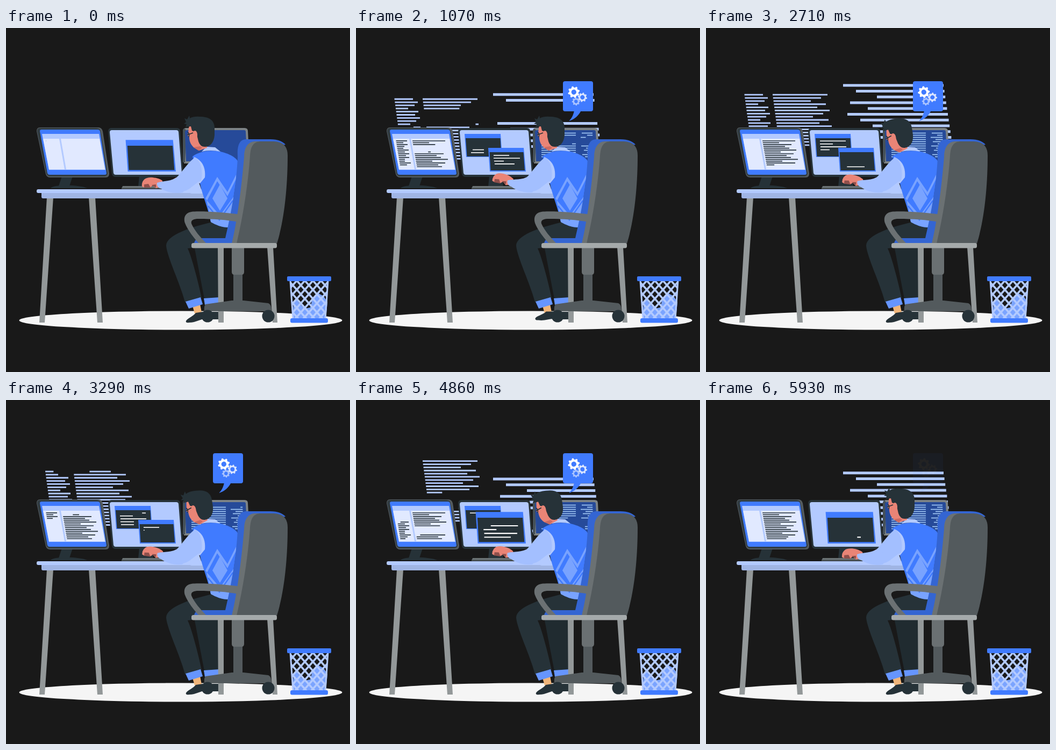
An HTML page for the animation above (6 s loop, 640 by 640 pixels).

```html
<!DOCTYPE html>
<html lang="en">
<head>
<meta charset="utf-8">
<title>Developer at work</title>
<style>
html, body { margin: 0; width: 100%; height: 100%; overflow: hidden; background: #191919; }
svg { display: block; width: 100vw; height: 100vh; }
</style>
</head>
<body>
<svg viewBox="0 0 640 640">
  <defs>
    <clipPath id="bin"><path d="M528 470H600L595 541H533Z"/></clipPath>
  </defs>
  <rect width="640" height="640" fill="#191919"/>
  <ellipse cx="325" cy="544" rx="300.500" ry="17.500" fill="#f5f5f5"/>
  <g id="backdrop"></g>

  <!-- right monitor -->
  <path d="M335 186H444Q450 186 450 192L453 252H331L329 192Q329 186 335 186Z" fill="#7d8386"/>
  <path d="M332 187L336 191L333 250H329V192Q329 188 332 187Z" fill="#465158"/>
  <path d="M338 190H443Q446 190 446 193L449 248H335L333 193Q333 190 338 190Z" fill="#264a99"/>
  <g id="sideCode"></g>

  <!-- left monitor -->
  <path d="M104 276H124L118 294H98Z" fill="#263238"/>
  <path d="M83 298C88 290 140 292 151 298Z" fill="#263238"/>
  <path d="M63 185H172Q178 185 180 192L192 271Q192 278 186 278H82Q76 278 74 272L57 192Q57 185 63 185Z" fill="#555c60"/>
  <path d="M63 186H168Q175 186 176 192L189 270Q189 275 184 276H82Q77 276 75 271L58 192Q58 186 63 186Z" fill="#303b41"/>
  <path d="M66 189H171Q174 189 175 192L187 270Q187 273 184 273H81Q78 273 77 270L63 192Q63 189 66 189Z" fill="#407bff"/>
  <path d="M67 197H173L185 264H80Z" fill="#b3caff"/>
  <path d="M69 206H99L109 263H80ZM102 206H174L184 263H112Z" fill="#e1e9ff"/>
  <g id="leftCode"></g>

  <!-- middle monitor -->
  <path d="M248 275H272L274 295H246Z" fill="#263238"/>
  <path d="M196 186H318Q324 186 324 192L330 271Q330 277 324 277H204Q198 277 197 271L190 193Q190 186 196 186Z" fill="#28343a"/>
  <path d="M197 190H317Q320 190 321 193L327 270Q327 273 324 273H204Q201 273 200 270L193 194Q193 190 197 190Z" fill="#b3caff"/>
  <g id="rearWin">
    <path d="M202 197H269L272 240H205Z" fill="#407bff"/>
    <path d="M204 205H268.500L270.500 239H206.500Z" fill="#263238"/>
  </g>
  <g id="frontWin">
    <path d="M246 223H312L316 267H249Z" fill="#407bff"/>
    <path d="M248.500 231H311.500L314 265H250.500Z" fill="#263238"/>
  </g>

  <!-- desk -->
  <path d="M76 315H88L72 548H62ZM154 315H166L180 548H170Z" fill="#939899"/>
  <path d="M66 306H372L376 317H69Q66 317 66 314Z" fill="#a0b5e4"/>
  <rect x="57" y="300" width="320" height="7" rx="3" fill="#b3caff"/>
  <path d="M217 294H305V299H215Z" fill="#6b7274"/>
  <path d="M215 297H305V299.500H215Z" fill="#4f575a"/>

  <g id="bubble">
    <path d="M406 153H419C414 164 406 170 396 173C402 168 405 160 406 153Z" fill="#407bff"/>
    <rect x="385" y="99" width="56" height="56" rx="4" fill="#407bff"/>
  </g>

  <!-- legs and shoes -->
  <path d="M350 405L369 504L398 503L396 400Z" fill="#202b30"/>
  <path d="M377 533L384 528H397V542H376Z" fill="#263238"/>
  <path d="M368 503L397 501L399 513L370 515Z" fill="#6695ff"/>
  <path d="M347 517L361 514L364 529L351 531Z" fill="#f0b57a"/>
  <path id="foot" d="M335 547C333 542 348 537 353 530L366 528L373 533V541C361 541 354 548 341 548Q336 549 335 547Z" fill="#263238"/>
  <path d="M384 361C345 370 298 385 298 405C300 427 324 475 333 510L364 502C358 475 347 430 338 410L420 402V362Z" fill="#263238"/>
  <path d="M334 509L362 501L366 514L340 522Z" fill="#6695ff"/>

  <!-- body -->
  <path d="M306 288Q310 280 320 277L326 284L316 292Z" fill="#e98476"/>
  <path d="M326 300L357 282L366 308H345Z" fill="#b3caff"/>
  <path d="M347 239C362 227 385 228 394 229C416 233 431 242 433 252L415 371C401 371 390 366 381 361C377 338 365 310 361 290Z" fill="#407bff"/>
  <path d="M371 317L393 277L412 305L428 273V281L412 313L393 285L374 321Z" fill="#79a3ff"/>
  <path d="M398 291L412 317L398 340L384 317Z" fill="#79a3ff"/>
  <path d="M373 320L398 349L427 309L415 371C401 371 390 366 381 361Q378 341 373 320Z" fill="#79a3ff"/>
  <path d="M376 331L397 357L422 321" fill="none" stroke="#407bff" stroke-width="2.500"/>
  <path d="M364 230L373 221L389 222L399 230Q380 226 364 230Z" fill="#b3caff"/>
  <path d="M350 240C364 246 372 258 370 278L361 289L345 285Z" fill="#b3caff"/>
  <path d="M352 241C341 247 329 266 316 280L318 300C326 308 338 302 345 296C352 291 357 286 363 284C367 268 363 248 352 241Z" fill="#a3bfff"/>
  <g id="arm">
    <g id="hand">
      <path d="M291 284C281 277 263 276 257 282Q252 287 253 295L258 297Q259 291 264 291L268 297L273 293L279 298L291 295Z" fill="#e98476"/>
      <path d="M257 291L265 290L269 297H257ZM271 292L279 291V297Z" fill="#8f4f4b"/>
    </g>
    <path d="M320 276C308 286 293 284 281 288C280 294 284 298 289 299C298 305 314 309 329 306L338 292Z" fill="#a3bfff"/>
  </g>

  <g id="head">
    <path d="M341 182C339 188 340 193 338 200L341 203C341 211 344 217 349 222L359 228L374 223V195L350 180Z" fill="#e98476"/>
    <path d="M349 222L361 220L365 223L358 228Z" fill="#cc6b62"/>
    <path d="M334 184L336 179L331 178L335 175L332 168L337 170L341 163L342 168Q349 164 361 165C377 165 388 171 388 186V199C387 214 379 221 370 221Q361 221 358 211L354 194L346 191L344 183Z" fill="#263238"/>
    <ellipse cx="351.500" cy="199" rx="4.500" ry="8" fill="#e98476"/>
    <path d="M337 199L348 195M338 194Q342 196 340 203" fill="none" stroke="#263238" stroke-width="1.600"/>
  </g>

  <!-- chair -->
  <path d="M394 408H405V548H395ZM486 408H497L505 548H496Z" fill="#939899"/>
  <rect x="423" y="455" width="17" height="60" fill="#535a5d"/>
  <path d="M420 408H443V454Q443 459 438 459H425Q420 459 420 454Z" fill="#6a7072"/>
  <path d="M371 514L420 507H442L488 512Q494 514 494 527H369Q368 518 371 514Z" fill="#535a5d"/>
  <circle cx="375" cy="536" r="11.500" fill="#263238"/>
  <circle cx="488" cy="536" r="11.500" fill="#263238"/>
  <path d="M431 240C430 220 433 207 448 207H492Q511 207 520 217L460 230L424 400H350Q352 391 362 391H408C418 350 429 290 431 240Z" fill="#3465d2"/>
  <path d="M443 240C443 220 452 211 464 211H484L470 260L440 401H420C429 365 438 300 443 240Z" fill="#6b7173"/>
  <path d="M454 238C455 219 461 211 475 211H498Q524 212 524 237C524 300 517 360 504 401H429C440 355 450 295 454 238Z" fill="#535a5d"/>
  <path d="M434 347C410 343 360 340 345 342C333 344 330 353 333 363C338 376 350 391 359 401H373C362 390 350 376 345 364C343 357 350 355 358 355C385 355 412 357 432 361Z" fill="#6b7173"/>
  <rect x="345" y="400" width="159" height="9.500" rx="3.500" fill="#a5aaab"/>

  <!-- basket -->
  <path d="M533 541L535 512L541 506L549 516L556 522L566 520L570 505L580 493L591 499L598 510L595 541Z" fill="#7ba4ff"/>
  <g id="mesh" clip-path="url(#bin)" stroke="#b3caff" stroke-width="3.600"></g>
  <path d="M529 470L534 541M599 470L594 541" stroke="#b3caff" stroke-width="3"/>
  <rect x="523" y="462" width="82" height="9" rx="2" fill="#407bff"/>
  <rect x="529" y="540" width="70" height="8.500" rx="3" fill="#407bff"/>
</svg>
<script>
const LOOP = 6, HALF = 3;
const $ = id => document.getElementById(id);
const clamp = v => Math.min(1, Math.max(0, v));
const ramp = (t, a, b) => { const k = clamp((t - a) / (b - a)); return k * k * (3 - 2 * k); };

function add(parent, tag, attrs) {
  const el = document.createElementNS('http://www.w3.org/2000/svg', tag);
  for (const k in attrs) el.setAttribute(k, attrs[k]);
  parent.appendChild(el);
  return el;
}

// A block of code rows; rows are [start, end] pairs.
function block(parent, rows, y, dy, color, width) {
  const g = add(parent, 'g', { stroke: color, 'stroke-width': width });
  const items = rows.map(([a, b], i) =>
    ({ a, b, el: add(g, 'line', { y1: y + i * dy, y2: y + i * dy }) }));
  return { g, items };
}

function show({ items }, range, back) {
  items.forEach(({ a, b, el }, i) => {
    let [from, to] = range(i);
    if (back) [from, to] = [1 - to, 1 - from];
    el.setAttribute('x1', a + (b - a) * from);
    el.setAttribute('x2', a + (b - a) * to);
    el.setAttribute('visibility', to - from > .01 ? 'visible' : 'hidden');
  });
}

// span: text between the erase and type fronts; gap: old text beyond the erase front stays.
const span = (type, erase) => i => [clamp(erase - i), clamp(type - i)];
const gap = (type, erase) => i => type > i ? [0, clamp(type - i)] : [clamp(erase - i), 1];
const slanted = (ends, x, step) => ends.map((e, i) => [x + i * step, e]);

const back = $('backdrop'), pale = '#b3caff', ink = '#263238';
const noteA = block(back, slanted([106, 115, 109, 97, 116, 110, 119, 112, 101, 120, 115, 123], 71.5, .8), 0, 5.85, pale, 2.8);
const noteB = block(back, slanted([226, 214, 195, 223, 207, 230, 218, 199, 228, 211, 234, 222, 230, 236,
  225, 238, 230, 226, 235, 228], 124, .78), 0, 5.85, pale, 2.8);
const wide = block(back, [255, 279, 318, 268, 301, 263, 287, 310, 275, 300]
  .map((x, i) => [x, 442 + i * 1.6]), 0, 10.75, pale, 5);

const listA = block($('leftCode'), slanted([95, 88, 96, 90, 88, 98, 91, 99, 93, 99, 91, 91, 102, 96, 92], 74.5, .56),
  210, 3.43, ink, 1.7);
const listB = block($('leftCode'), slanted([166, 136, 159, 147, 155, 168, 139, 163, 150, 158, 171, 142, 166, 153, 160],
  105, .6), 210, 3.43, ink, 1.7);

const sideA = block($('sideCode'), Array.from({ length: 12 }, () => [345, 409]), 195.5, 4, '#a9cffa', 1.6);
const sideB = block($('sideCode'), [420, 430, 418, 427, 422, 431, 419, 428, 424, 430, 421, 426]
  .map((x, i) => [x, 440 + i * .2]), 195.5, 4, '#a9cffa', 1.6);

const rearText = block($('rearWin'), [[212, 260], [212, 236], [213, 261], [213, 238], [214, 238]], 210.3, 5.4, '#fff', 1.6);
const frontText = block($('frontWin'), [[256, 285], [256, 305], [257, 275], [258, 304], [258, 295]], 237, 5.3, '#fff', 1.6);

for (let x = 436; x < 690; x += 15) {
  add($('mesh'), 'path', { d: `M${x} 470l64 72M${x} 470l-64 72` });
}

function gear(x, y, r, hole, color) {
  const teeth = 8;
  let d = '';
  for (let i = 0; i < teeth * 4; i++) {
    const q = (i + .5) / (teeth * 4) * Math.PI * 2;
    const len = i % 4 < 2 ? r : r * .78;
    d += (i ? 'L' : 'M') + (len * Math.cos(q)).toFixed(2) + ' ' + (len * Math.sin(q)).toFixed(2);
  }
  const g = add($('bubble'), 'g', {});
  add(g, 'path', { d: d + 'Z', fill: color });
  add(g, 'circle', { r: hole, fill: '#407bff' });
  return turn => g.setAttribute('transform', `translate(${x} ${y}) rotate(${turn})`);
}
const gears = [
  gear(405.3, 119.3, 11, 4.7, '#fff'),
  gear(421.3, 129, 8.8, 3.9, '#d9e4ff'),
  gear(409.3, 136.7, 7.6, 3.2, '#a9c3ff')
];

function draw(t) {
  const p = t % HALF;
  const on = t >= .07 ? 1 : 0;
  const move = (el, value) => el.setAttribute('transform', value);
  const fade = (el, value) => el.setAttribute('opacity', value);

  // backdrop code
  const rise = `translate(0 ${137.5 - 4.9 * t})`;
  move(noteA.g, rise);
  move(noteB.g, rise);
  show(noteA, span(8.7 * t, 8.85 * (t - 3)), true);
  show(noteB, gap(8.35 * (p - .63), 8.35 * p));
  fade(noteB.g, on * (1 - ramp(t, 5.2, 5.75)));

  const age = (t + 2) % LOOP;
  move(wide.g, `translate(0 ${156 - 10.47 * age})`);
  show(wide, gap(5 * (p - .67), 5 * (p - .07)), true);
  fade(wide.g, on * (age > 5.2 ? 0 : clamp((age + .05) / .33)));

  // screens
  show(listA, span(13 * p, 12.8 * (p - 1.45)));
  show(listB, gap(6.45 * (p - .64), 6.7 * (p - .05)));
  const sideRange = gap(5.5 * (p - .63), 5.5 * p);
  show(sideA, sideRange);
  show(sideB, sideRange);
  [listB, sideA, sideB].forEach(b => fade(b.g, on));

  const grow = 1 + .335 * (1 - ramp(t, .2, .7) + ramp(t, 4.3, 4.75));
  move($('frontWin'), `translate(316 267) scale(${grow}) translate(-316 -267)`);
  fade($('rearWin'), ramp(t, .3, .7) - ramp(t, 5.1, 5.5));
  show(rearText, gap(3.4 * (p - 1.63), 2.95 * p));
  show(frontText, span(3.55 * p, 3.4 * (p - 1.5)));

  fade($('bubble'), ramp(t, .6, 1) - ramp(t, 5.45, 6));
  gears[0](t * 60);
  gears[1](-t * 60 + 20);
  gears[2](t * 60 + 10);

  // person
  const nod = ramp(t, 1.3, 1.9) - ramp(t, 5.1, 5.7);
  move($('head'), `translate(${-8 * nod} ${4 * nod}) rotate(${-9 * nod} 360 165)`);
  const tap = t < 2.72 ? t : t > 5.21 && t < 5.89 ? t - 5.21 : 0;
  move($('foot'), `rotate(${9 * Math.sin(tap / .68 * Math.PI) ** 2} 370 535)`);
  const type = 1 - Math.cos(t / LOOP * 14 * 2 * Math.PI);
  move($('arm'), `rotate(${2.6 * type} 332 296)`);
  move($('hand'), `rotate(${3 * type} 288 290)`);
}

const start = performance.now();
function tick() {
  draw((performance.now() - start) / 1000 % LOOP);
  requestAnimationFrame(tick);
}
tick();
</script>
</body>
</html>
```
